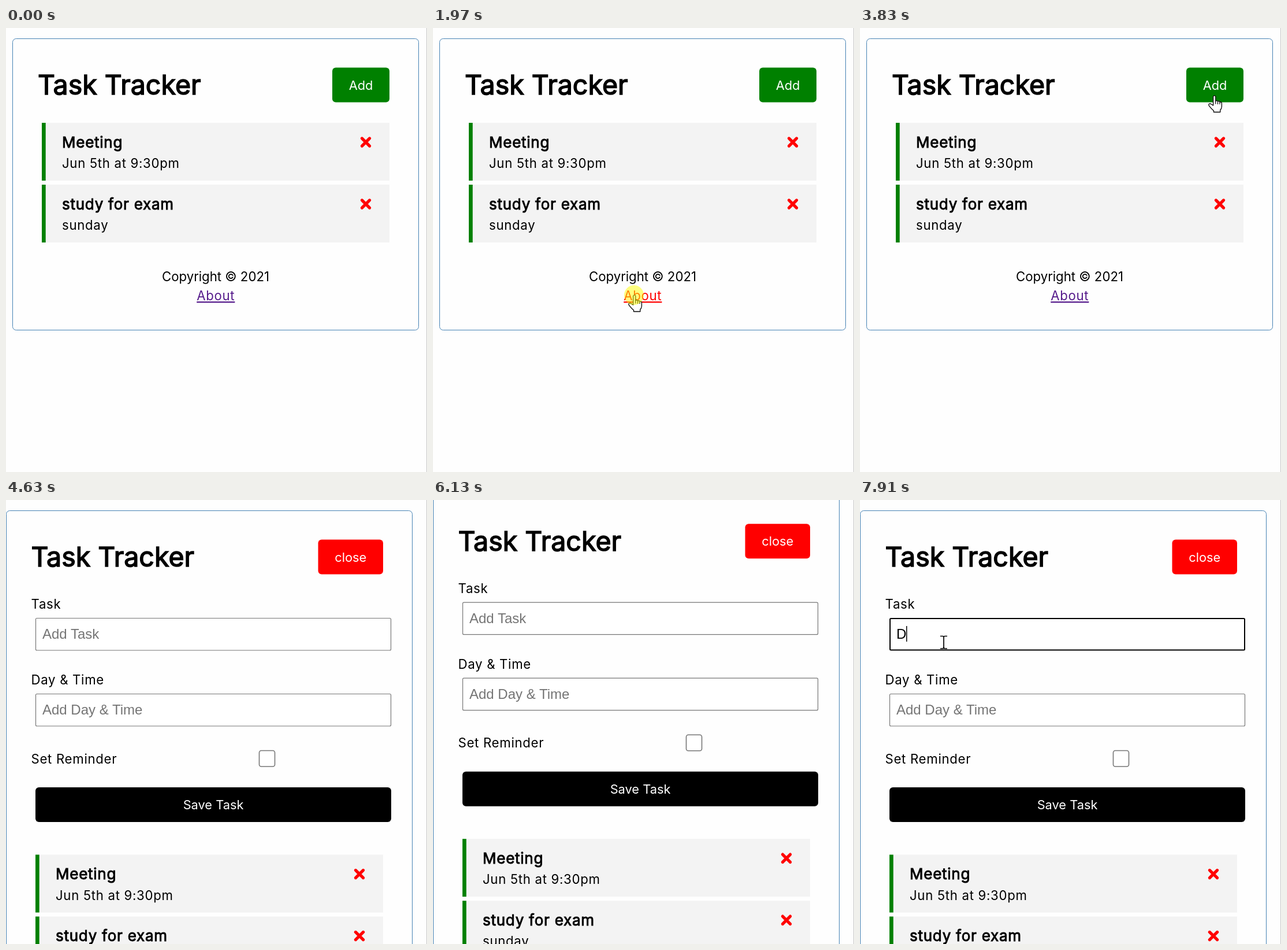
An HTML page for the animation above (8 s loop, 729 by 768 pixels).

```html
<!DOCTYPE html>
<html lang="en">
<head>
<meta charset="utf-8">
<title>Task Tracker</title>
<style>
  html, body { margin: 0; width: 100%; height: 100%; overflow: hidden; background: #fefefe; }
  svg { display: block; }
  text { font: 22.2px Inter, "Open Sans", sans-serif; white-space: pre; }
  .heading { font-size: 46.5px; stroke: #000; stroke-width: 1.5px; }
  .name { font-size: 26px; letter-spacing: .75px; stroke: #000; stroke-width: .9px; }
  .strong { stroke: #000; stroke-width: .8px; }
  .body { letter-spacing: .7px; }
  .button { font-size: 21.8px; fill: #fff; text-anchor: middle; }
  .center { text-anchor: middle; }
  .link { text-decoration: underline; letter-spacing: .7px; }
  .input { font: 24px "Liberation Sans", Arial, sans-serif; }
</style>
</head>
<body>
<svg id="stage" width="729" height="768" viewBox="0 0 729 768"></svg>
<script>
const LOOP = 8000;
const stage = document.getElementById('stage');
const between = (t, from, to) => t >= from && t < to;

// Basic pieces
const text = (x, y, cls, value, fill = '') =>
  `<text x="${x}" y="${y}" class="${cls}" ${fill && `fill="${fill}"`}>${value}</text>`;
const rect = (x, y, w, h, attrs) => `<rect x="${x}" y="${y}" width="${w}" height="${h}" ${attrs}/>`;
const group = (x, y, content, extra = '') => `<g transform="translate(${x} ${y})${extra}">${content}</g>`;
const path = (d, attrs) => `<path d="${d}" ${attrs}/>`;
const link = (x, y, cls, value, hot) => text(x, y, 'link ' + cls, value, hot ? '#f00' : '#551a8b');

const button = (x, y, w, label, fill) =>
  rect(x, y, w, 60, `rx="6" fill="${fill}"`) + text(x + w / 2, y + 38, 'button', label);

const card = (x, bottom) =>
  rect(x + .5, 18.5, 703, bottom - 18.5, 'rx="6" fill="none" stroke="#4682b4"');

const task = (y, name, day) => group(62, y,
  rect(0, 0, 602, 100, 'fill="#f3f3f3"') + rect(0, 0, 6.7, 100, 'fill="#008000"') +
  text(35, 42.5, 'name', name) + text(35, 78, 'body', day) +
  path('M554.4 26.9l13.2 13.2m0-13.2l-13.2 13.2', 'stroke="#f00" stroke-width="5.2" stroke-linecap="round"'));

const footer = (y, hot) =>
  text(363, y, 'center', 'Copyright © 2021') + link(363.3, y + 33, 'center', 'About', hot);

const list = hot =>
  task(164, 'Meeting', 'Jun 5th at 9:30pm') + task(271, 'study for exam', 'sunday') + footer(438, hot);

const field = (y, label, value, focused, typed) =>
  text(43.5, y - 16, 'body', label) +
  (focused
    ? rect(52, y + 1, 614, 54.5, 'rx="1.5" fill="#fff" stroke="#000" stroke-width="2"')
    : rect(51.5, y + .5, 615, 55.5, 'rx="2" fill="#fff" stroke="#767676" stroke-width="1.2"')) +
  text(63, y + 36, 'input', value, typed ? '#000' : '#757575');

// Views
function mainView(t) {
  const pressed = between(t, 4080, 4300);
  const add = button(-49.5, -30, 99, 'Add', '#008000');
  return card(11, 522.5) + text(55, 115, 'heading', 'Task Tracker') +
    group(614.5, 98.5, add, pressed ? ' scale(.98)' : '') + list(between(t, 1970, 2180));
}

function aboutView(t) {
  return card(11, 439.5) + text(55, 112, 'heading', 'Task Tracker') +
    text(55, 181.5, 'strong', 'Version 1.0.0') +
    link(55, 215, '', 'Go Back', t >= 2960) + footer(290, false);
}

function scrollAt(t) {
  if (between(t, 5820, 5920)) return 94.5;
  if (between(t, 5920, 6130)) return 122;
  return between(t, 6130, 6250) ? 27.3 : 0;
}

function formView(t) {
  const typed = t >= 7910;
  const caretOn = between(t, 7140, 7690) || typed;
  return group(0, -scrollAt(t),
    card(0, 971.5) + text(43.5, 115, 'heading', 'Task Tracker') +
    button(540.5, 68.5, 112.5, 'close', '#f00') +
    field(204, 'Task', typed ? 'D' : 'Add Task', t >= 7140, typed) +
    (caretOn ? rect(typed ? 80 : 63.5, 218, 1.5, 27, '') : '') +
    field(335, 'Day &amp; Time', 'Add Day &amp; Time') +
    text(43.5, 455.5, 'body', 'Set Reminder') +
    rect(438.5, 433.5, 27, 27.5, 'rx="3.5" fill="#fff" stroke="#767676" stroke-width="1.6"') +
    button(51, 497, 616, 'Save Task', '#000') +
    group(-11, 449.5, list(false)));
}

// Pointer: start, end, steps, path (start, control, end), enters from outside, hidden at
const MOVES = [
  [430, 1190, 8, [676, 745], [600, -100], [576, 123], true, 1290],
  [1290, 1750, 5, [576, 123], [455, 285], [348, 462], false, 2400],
  [2400, 2960, 6, [348, 462], [230, 320], [101, 202], false, 3390],
  [3390, 3830, 5, [101, 202], [350, 170], [613, 117], false, 4630],
  [6480, 6920, 5, [705, 168], [430, 200], [143, 245], true, LOOP]
];
const CLICKS = [[1970, 2400], [2960, 3170], [4080, 4300], [7140, 7360]];

// Clickable areas of each view as x, y, width, height
const ZONES = {
  main: [[565, 68, 99, 60], [62, 164, 602, 100], [62, 271, 602, 100], [330, 446, 67, 33]],
  about: [[55, 190, 92, 33], [330, 298, 67, 33]],
  form: [[540, 68, 113, 60]]
};
const inside = (x, y, [left, top, w, h]) => between(x, left, left + w) && between(y, top, top + h);

const outlined = 'fill="#fff" stroke="#000" stroke-width="1.3" stroke-linejoin="round"';
const SHAPES = {
  arrow: path('M.6 .8V20.5L5 16.4 8.6 24.4 11.8 23 8.4 15.2H14.8Z', outlined),
  hand: path('M-1.4 17V1.5Q.7-1.8 2.8 1.5V9.5Q5 7.5 6.5 10Q8.8 8.7 10 11Q13.3 10.5 13.4 13.5V19' +
    'Q13 23 10.8 25V28.5H-.5V26Q-4 23.5-9 16.8Q-9.7 13.2-6 14Z', outlined) +
    path('M2.8 9.5v5M6.5 10v5M10 11v4', 'fill="none" stroke="#000" stroke-width="1.2"'),
  beam: path('M-4 -9.5h4q2 0 2 2V9q0 3 -2 3h-4M8 -9.5h-4q-2 0-2 2V9q0 3 2 3h4',
    'fill="none" stroke="#000" stroke-width="1.7"')
};

function pointer(t, view) {
  const move = MOVES.find(m => between(t, m[0], m[7]));
  if (!move) return '';
  const [start, end, steps, a, b, c, enters] = move;
  const index = Math.min(steps - 1, Math.floor((t - start) / (end - start) * (steps - 1) + .02));
  const lead = enters ? 0 : 1;
  const s = (index + lead) / (steps - 1 + lead);
  const k = s * s * (3 - 2 * s);
  const [x, y] = [0, 1].map(i => a[i] * (1 - k) ** 2 + 2 * b[i] * k * (1 - k) + c[i] * k * k);
  let shape = ZONES[view].some(zone => inside(x, y, zone)) ? 'hand' : 'arrow';
  if (view === 'form' && inside(x, y, [51, 204, 616, 56])) shape = 'beam';
  const clicked = CLICKS.some(([from, to]) => between(t, from, to));
  return group(x, y, SHAPES[shape] +
    (clicked ? '<circle r="17" fill="#ff0" fill-opacity=".5"/>' : ''));
}

const VIEWS = { main: mainView, about: aboutView, form: formView };
let shown = '';

function render(t) {
  const view = t >= 4300 ? 'form' : between(t, 2180, 3170) ? 'about' : 'main';
  const markup = rect(0, 0, 729, 768, 'fill="#fefefe"') + VIEWS[view](t) +
    rect(728, 0, 1, 768, 'fill="#c6c6c6"') + pointer(t, view);
  if (markup !== shown) stage.innerHTML = shown = markup;
}

const origin = performance.now();
function tick() {
  render((performance.now() - origin) % LOOP);
  requestAnimationFrame(tick);
}
tick();
</script>
</body>
</html>
```
